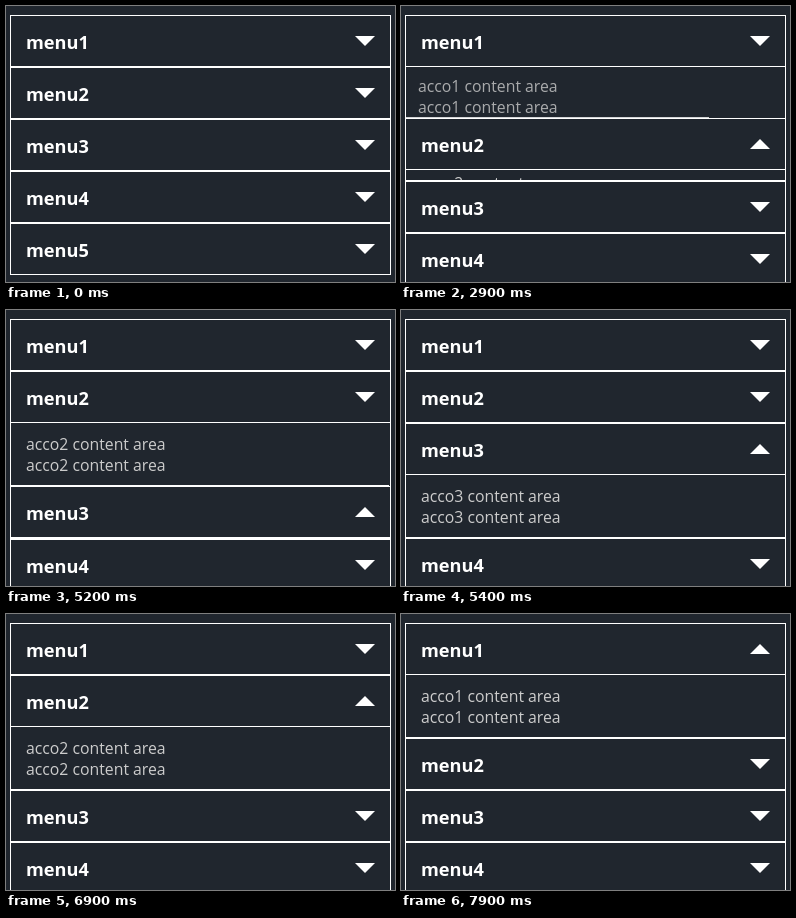
These frames come from a looping animation (389x276 px, 8 s). An HTML page:

```html
<!DOCTYPE html>
<html lang="en">
<head>
<meta charset="utf-8">
<title>Accordion menu</title>
<style>
  html, body { margin: 0; width: 100%; height: 100%; overflow: hidden; background: #20262e; }
  #stage { display: block; }
  .fill { fill: #20262e; }
  .line, .arrow { fill: #fff; }
  .title { font: 700 18.2px "Open Sans", "Noto Sans", sans-serif; fill: #fff; }
  .body { font: 400 15.8px "Open Sans", "Noto Sans", sans-serif; fill: #ccc; }
</style>
</head>
<body>
<svg id="stage" width="389" height="276" viewBox="0 0 389 276"></svg>
<script>
const LOOP = 8000, TICK = 100, SLIDE = 200;
const TOP = 9, LEFT = 4, WIDTH = 381, HEADER = 52, BODY = 62, PAD_X = 15, PAD_Y = 10;
const stage = document.getElementById('stage');

// openLead / closeLead: how far each slide has run when its first step shows.
const steps = [
  { at: 0, open: -1, close: -1, openLead: 0, closeLead: 0 },
  { at: 500, open: 0, close: -1, openLead: 100, closeLead: 0 },
  { at: 2900, open: 1, close: 0, openLead: 53, closeLead: 59 },
  { at: 5200, open: 2, close: 1, openLead: 3, closeLead: 7 },
  { at: 6700, open: 1, close: 2, openLead: 79, closeLead: 81 },
  { at: 7700, open: 0, close: 1, openLead: 33, closeLead: 36 }
];

function add(parent, tag, attrs, text) {
  const node = document.createElementNS('http://www.w3.org/2000/svg', tag);
  set(node, attrs);
  if (text) node.textContent = text;
  return parent.appendChild(node);
}

function set(node, attrs) {
  for (const key in attrs) node.setAttribute(key, attrs[key]);
}

const line = (parent, x, y, width, height) =>
  add(parent, 'rect', { class: 'line', x, y, width, height });

function makeItem(_, i) {
  const root = add(stage, 'g', {});
  // The fill also covers whatever overflows from the item above.
  add(root, 'rect', { class: 'fill', x: LEFT, y: 0, width: WIDTH, height: 300 });
  line(root, LEFT, 0, WIDTH, 1);
  line(root, LEFT, HEADER - 1, WIDTH, 1);
  const sides = [LEFT, LEFT + WIDTH - 1].map(x => line(root, x, 0, 1, HEADER));
  add(root, 'text', { class: 'title', x: 20, y: 34 }, 'menu' + (i + 1));
  const arrow = add(root, 'path', { class: 'arrow' });

  const panel = add(root, 'g', {});
  const box = add(panel, 'svg', { x: LEFT + 1, y: HEADER, overflow: 'hidden' });
  const texts = [0, 1].map(() => add(box, 'text', { class: 'body' }, `acco${i + 1} content area`));
  const edge = line(box, 0, 0, WIDTH - 2, 1);
  return { root, sides, arrow, panel, box, texts, edge };
}

const items = Array.from({ length: 5 }, makeItem);

function swing(ms) {
  const t = Math.min(Math.max(ms / SLIDE, 0), 1);
  return 0.5 - Math.cos(t * Math.PI) / 2;
}

function draw(time) {
  const now = Math.floor((time % LOOP) / TICK) * TICK;
  const step = steps.filter(s => s.at <= now).pop();
  const elapsed = now - step.at;
  let y = TOP;

  items.forEach((item, i) => {
    const opening = i === step.open;
    const closing = i === step.close && elapsed + step.closeLead < SLIDE;
    const amount = opening ? swing(elapsed + step.openLead)
      : closing ? 1 - swing(elapsed + step.closeLead) : 0;
    const shown = opening || closing;
    const height = shown ? Math.round(1 + BODY * amount) : 0;
    const scale = closing ? amount : 1; // closing also narrows and fades

    set(item.root, { transform: `translate(0 ${y})` });
    set(item.arrow, { d: opening ? 'M349 31h20l-10-10z' : 'M349 21h20l-10 10z' });
    item.sides.forEach(side => set(side, { height: HEADER + height }));
    set(item.panel, { opacity: scale, display: shown ? 'inline' : 'none' });
    set(item.box, { width: Math.round((WIDTH - 2) * scale), height });
    item.texts.forEach((text, row) =>
      set(text, { x: PAD_X * scale, y: Math.round(PAD_Y * amount + 17 + 21 * row) }));
    set(item.edge, { y: height - 1 });
    y += HEADER + height;
  });

  // Below the last item the page is plain background.
  set(floor, { y });
}

const floor = add(stage, 'rect', { class: 'fill', x: 0, width: 389, height: 300 });

let start;
function frame(time) {
  start ??= time;
  draw(time - start);
  requestAnimationFrame(frame);
}
draw(0);
requestAnimationFrame(frame);
</script>
</body>
</html>
```
